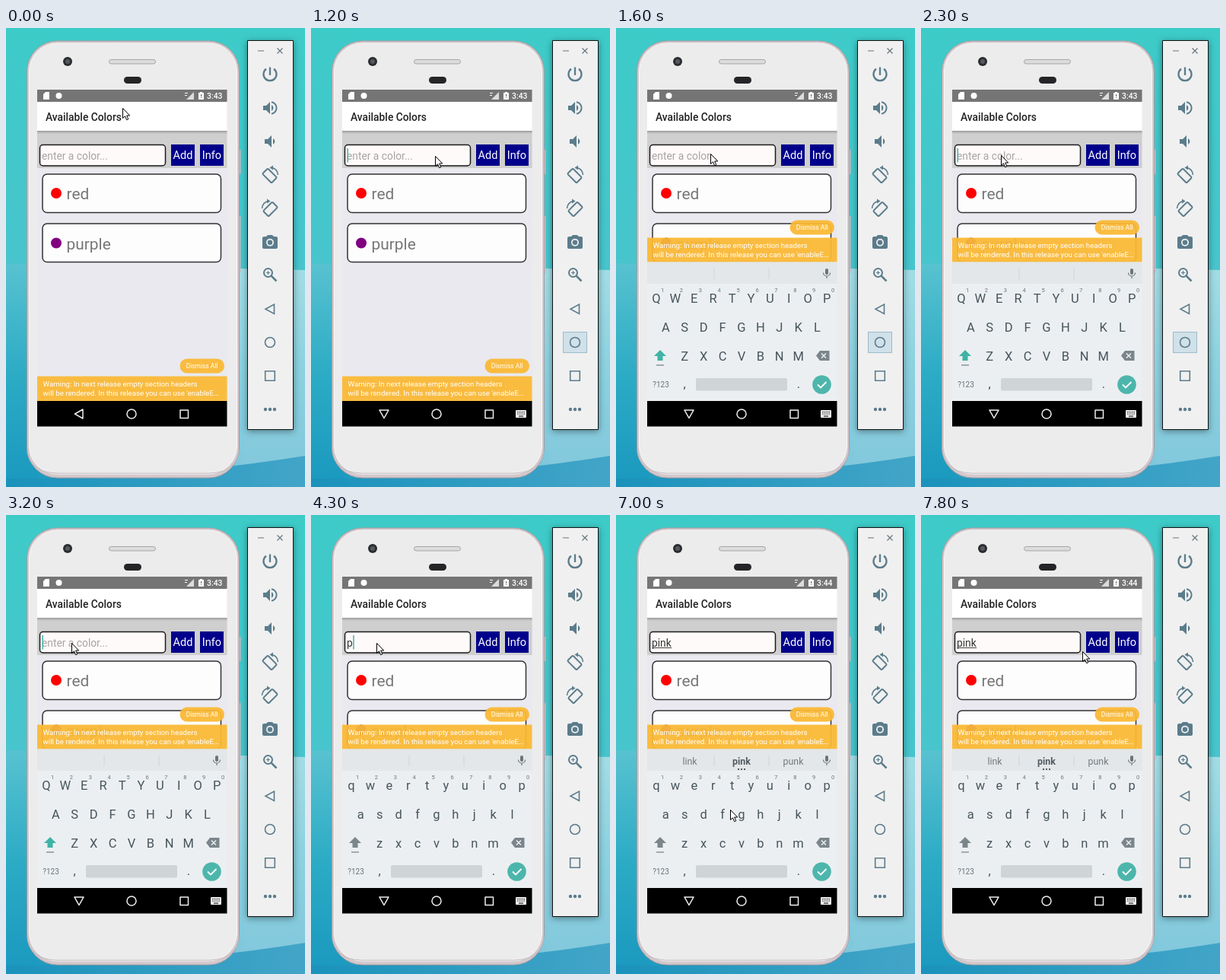
An HTML page for the animation above (8 s loop, 393 by 603 pixels).

```html
<!DOCTYPE html>
<html lang="en">
<head>
<meta charset="utf-8">
<title>Available Colors</title>
<style>
  html, body { margin: 0; width: 100%; height: 100%; overflow: hidden; }
  svg { display: block; width: 393px; height: 603px; }
  text { font-family: Roboto, sans-serif; white-space: pre; }
  .mid { text-anchor: middle; }
  .line { fill: none; stroke: #5b7c8b; stroke-width: 2; }
  .nav { fill: none; stroke: #eee; stroke-width: 1.5; stroke-linejoin: round; }
  .key { fill: #47555c; font-size: 16.5px; text-anchor: middle; }
  .digit { fill: #68747a; font-size: 7.5px; text-anchor: middle; }
  .panel { filter: drop-shadow(0 2px 4px #0006); }
</style>
</head>
<body>
<svg viewBox="0 0 393 603">
  <defs>
    <linearGradient id="sky" x2="0" y2="1">
      <stop stop-color="#3dcbc8"/><stop offset="1" stop-color="#48c4cd"/>
    </linearGradient>
    <linearGradient id="sea" x2="0" y2="1">
      <stop stop-color="#58c2d0"/><stop offset=".5" stop-color="#2cabc5"/><stop offset="1" stop-color="#1a98bf"/>
    </linearGradient>
    <linearGradient id="glow">
      <stop offset=".1" stop-color="#fff" stop-opacity="0"/><stop offset=".8" stop-color="#fff" stop-opacity=".45"/>
    </linearGradient>
    <linearGradient id="floor">
      <stop stop-color="#1a92bb"/><stop offset="1" stop-color="#42a5c8"/>
    </linearGradient>
    <linearGradient id="shade" x2="0" y2="1">
      <stop stop-color="#999"/><stop offset="1" stop-color="#cfcfcf"/>
    </linearGradient>
    <clipPath id="app"><path d="M41 81H290.500V490H41Z"/></clipPath>
  </defs>

  <path fill="url(#sky)" d="M0 0H393V325H0Z"/>
  <path fill="url(#sea)" d="M0 309L393 318V603H0Z"/>
  <path fill="url(#glow)" d="M0 309L393 318V603H0Z"/>
  <path fill="url(#floor)" d="M0 603V592Q210 592 393 562V603Z"/>

  <!-- Phone body -->
  <g stroke="#b9b0b4">
    <path fill="#ddd" d="M305 160h3v32h-3zM305 247h3v74h-3z"/>
    <rect x="27.500" y="17" width="279" height="574" rx="40" fill="#d3c8cc" stroke="#a69ba0"/>
    <rect x="30.500" y="20" width="273" height="566" rx="37" fill="#ececed" stroke="#f8f8f8"/>
    <path d="M28 554q2 29 38 31H268q36-2 38-31" fill="none" stroke="#c3b9bd"/>
    <rect x="135.500" y="41.500" width="61" height="5.500" rx="2.700" fill="#dcdcdc" stroke="#a5a5a5"/>
  </g>
  <circle cx="81" cy="44" r="6" fill="#2b2c2f"/>
  <circle cx="81" cy="44" r="3" fill="#555961"/>
  <rect x="155" y="64" width="23" height="9" rx="4.500" fill="#252528"/>

  <!-- App -->
  <g clip-path="url(#app)">
    <path fill="#e9e9ef" d="M41 81H291V490H41Z"/>
    <path fill="#757575" d="M41 81H291V97H41Z"/>
    <path fill="#cfcfcf" d="M41 135H291V184H41Z"/>
    <path fill="url(#shade)" d="M41 135H291V139H41Z"/>
    <path fill="#fff" d="M41 97H291V135H41Z"/>
    <g fill="#fff">
      <path d="M52 84h5v10h-8v-7z"/>
      <circle cx="69.500" cy="89" r="4"/>
      <path d="M247 84v10h-10z" opacity=".75"/>
      <path d="M235 85h4v1h-4zM235 88h3v1h-3z"/>
      <path d="M255 84h3v1h2v9h-7v-9h2z"/>
      <path d="M256 87h1.200v3h-1.200zM256 91h1.200v1h-1.200z" fill="#757575"/>
      <text id="clock" x="264" y="93" font-size="10.400" font-weight="500"></text>
    </g>
    <text x="52" y="122" font-size="13.800" font-weight="500" fill="#222">Available Colors</text>

    <rect x="44.500" y="153.500" width="165" height="27.500" rx="4" fill="#fffafa" stroke="#1a1a1a" stroke-width="1.500"/>
    <text id="entry" x="47" y="172.500" font-size="13.800"></text>
    <path id="underline" fill="#444" d=""/>
    <rect id="caret" y="158" width="1.500" height="18.500" fill="#43b3a8"/>
    <path fill="#00008b" d="M217 153h31v28h-31zM255 153h31v28h-31z"/>
    <g fill="#fff" font-size="14.500" class="mid">
      <text x="232.500" y="172">Add</text><text x="270.500" y="172">Info</text>
    </g>

    <g fill="#fdfdfd" stroke="#333" stroke-width="1.500">
      <rect x="48" y="192" width="234.500" height="50.500" rx="6"/>
      <rect x="48" y="257" width="234.500" height="50.500" rx="6"/>
    </g>
    <circle cx="66" cy="217" r="7" fill="red"/>
    <circle cx="66" cy="282.500" r="7" fill="purple"/>
    <g fill="#777" font-size="20.900">
      <text x="79.500" y="225">red</text><text x="79.500" y="290.500">purple</text>
    </g>

    <g id="warning">
      <g fill="#fab935" opacity=".94">
        <path d="M41 457.500H291V490H41Z"/>
        <rect x="228.500" y="434.500" width="58.500" height="19" rx="9.500"/>
      </g>
      <g fill="#fff" font-size="9.700">
        <text x="257.500" y="447" font-size="8.400" class="mid">Dismiss All</text>
        <text x="48.500" y="471">Warning: In next release empty section headers</text>
        <text x="48.500" y="483">will be rendered. In this release you can use 'enableE…</text>
      </g>
    </g>

    <g id="keyboard">
      <path fill="#eceff1" d="M41 307.500H291V490H41Z"/>
      <path fill="#e4e7e9" d="M41 307.500H291V336H41Z"/>
      <path d="M129 315.500V330M201 315.500V330" stroke="#d0d5d8"/>
      <g id="hints" fill="#72797d" font-size="12.400" class="mid">
        <text x="97" y="328">link</text>
        <text x="165" y="328" font-weight="700" fill="#525b60">pink</text>
        <text x="233" y="328">punk</text>
        <path fill="#525b60" d="M160 333h2v2h-2zM164 333h2v2h-2zM168 333h2v2h-2z"/>
      </g>
      <rect x="275" y="316" width="4" height="8" rx="2" fill="#6b7579"/>
      <path d="M272.500 321.500a4.500 4.500 0 0 0 9 0M277 326v3" fill="none" stroke="#6b7579" stroke-width="1.200"/>
      <g id="keys"></g>
      <path id="shift" d="M58 423l8 8h-4.500v6h-7v-6H50z"/>
      <path fill="#9aa2a6" d="M53 442h10v1.800H53z"/>
      <path fill="#7b868b" d="M263 430.500l5-6.500h12.500v13H268z"/>
      <path d="M270 427.500l6 6m0-6l-6 6" stroke="#eceff1" stroke-width="1.500"/>
      <text x="59" y="472" font-size="10" fill="#68747a" class="mid">?123</text>
      <text x="90" y="473" class="key">,</text><text x="240" y="473" class="key">.</text>
      <rect x="105" y="460" width="120" height="16.500" rx="2" fill="#cfd4d6"/>
      <circle cx="270.500" cy="468.500" r="12.300" fill="#4db6ac"/>
      <path d="M265 468.500l4 4 7.500-7.500" fill="none" stroke="#fff" stroke-width="1.800"/>
    </g>
  </g>

  <path d="M41 490H290.500V523.500H41Z"/>
  <g class="nav">
    <path id="back"/>
    <circle cx="165" cy="507" r="6"/>
    <path d="M229 502h10.500v10.500H229z"/>
  </g>
  <g id="imeIcon">
    <rect x="269" y="502" width="14" height="10" rx="1" fill="#eee"/>
    <path d="M271 504.500h10M271 507h10" stroke="#000" stroke-dasharray="1.200 1"/>
    <path d="M273 510h6" stroke="#000"/>
  </g>

  <!-- Emulator panel -->
  <path class="panel" fill="#f0f0f0" stroke="#111" d="M317.500 16.500h60v511h-60z"/>
  <path d="M331 30h8M356.500 26.500l7 7m0-7l-7 7" stroke="#68777e" stroke-width="1.200"/>
  <rect id="focus" x="331.500" y="399.500" width="31" height="27" fill="#d0e1e9" stroke="#9dbccb"/>
  <g fill="#5b7c8b">
    <g transform="translate(347 61)" class="line">
      <path d="M0-9.500V1M-5-7.200a8.500 8.500 0 1 0 10 0" stroke-width="2.300"/>
    </g>
    <g transform="translate(347 105)">
      <path d="M-9-3h4l5-5V8l-5-5h-4zM2-4a4.500 4.500 0 0 1 0 8z"/>
      <path class="line" d="M2-7.700a7.800 7.800 0 0 1 0 15.400"/>
    </g>
    <path transform="translate(347 149)" d="M-7-3h4l5-5V8l-5-5h-4zM4-4a4.500 4.500 0 0 1 0 8z"/>
    <g id="rotate">
      <rect x="-5" y="-8.500" width="10" height="17" rx="1.500" transform="translate(-.5 1) rotate(-45)" class="line"/>
      <path d="M2-9.500Q9.500-8.500 10.500 0" class="line" style="stroke-width:1.600"/>
      <path d="M-.5-9.500l4.500-3v6z"/>
    </g>
    <g transform="translate(347 281)">
      <path d="M-3-9h6l2 2h3a2 2 0 0 1 2 2V7a2 2 0 0 1-2 2h-16a2 2 0 0 1-2-2V-5a2 2 0 0 1 2-2H-5z"/>
      <circle cy=".8" r="5" fill="#f0f0f0"/><circle cy=".8" r="3.200"/>
    </g>
    <g transform="translate(347 324)" class="line">
      <circle cx="-2.500" cy="-2.500" r="5.500"/>
      <path d="M1.700 1.700L8.500 8.500" stroke-width="2.600"/>
      <path d="M-5-2.500h5M-2.500-5v5" stroke-width="1.200"/>
    </g>
    <g class="line" style="stroke-width:1.600">
      <path d="M352.500 363v12.500l-11.500-6.200z"/>
      <circle cx="347" cy="413" r="6.500"/>
      <path d="M340.700 450.700h12.600v12.600h-12.600z"/>
    </g>
    <circle cx="341" cy="501" r="2.200"/><circle cx="347" cy="501" r="2.200"/><circle cx="353" cy="501" r="2.200"/>
  </g>

  <path id="pointer" d="M.5.5V13.500L3.500 10.800 5.600 15.700 7.800 14.800 5.700 10H9.700Z" fill="#fff" stroke="#000"/>
</svg>

<script>
const LOOP = 8000, STEP = 100;
const $ = id => document.getElementById(id);
const show = (id, on) => $(id).style.display = on ? '' : 'none';

// The two rotate buttons mirror each other.
const rotate = $('rotate'), mirrored = rotate.cloneNode(true);
rotate.setAttribute('transform', 'translate(347 193)');
mirrored.removeAttribute('id');
mirrored.setAttribute('transform', 'translate(347 237) scale(-1 1)');
rotate.after(mirrored);

const rows = [['qwertyuiop', 53, 361], ['asdfghjkl', 65.3, 399], ['zxcvbnm', 90.2, 437]];
const label = (cls, x, y, s) => `<text class="${cls}" x="${x}" y="${y}">${s}</text>`;
$('keys').innerHTML = rows.map(([letters, x, y], row) => [...letters].map((c, i) => {
  const cx = x + i * 24.9;
  return label('key letter', cx, y, c) +
    (row ? '' : label('digit', cx + 8, 347, (i + 1) % 10));
}).join('')).join('');
const letters = [...document.querySelectorAll('.letter')];

// Pointer stops: time, x, y
const path = [
  [0, 153, 105], [300, 167, 148], [500, 163, 168], [1300, 163, 168],
  [1600, 124, 165], [2200, 124, 165], [2400, 86, 168], [6600, 86, 168],
  [7000, 150, 387], [7500, 208, 192], [7800, 212, 179], [LOOP, 212, 179]
];
function pointerAt(t) {
  const i = path.findIndex(p => p[0] > t);
  const [t0, x0, y0] = path[i - 1], [t1, x1, y1] = path[i];
  const k = (t - t0) / (t1 - t0);
  return [x0 + (x1 - x0) * k, y0 + (y1 - y0) * k].map(Math.round);
}

// Times at which the caret toggles, starting hidden
const blinks = [900, 1400, 1900, 3600, 4100, 5800, 6200, 6700, 7200, 7700];
const strokes = [4300, 4700, 4900, 5100];
const passed = (times, t) => times.filter(s => t >= s).length;

function draw(t) {
  const typed = 'pink'.slice(0, passed(strokes, t));
  const upper = !typed, ime = t >= 1200, open = t >= 1400;

  $('pointer').setAttribute('transform', `translate(${pointerAt(t)})`);
  $('clock').textContent = t < 4400 ? '3:43' : '3:44';

  const entry = $('entry');
  entry.textContent = typed || 'enter a color...';
  entry.setAttribute('fill', typed ? '#333' : '#a9a4a4');
  const width = typed ? entry.getComputedTextLength() : 0;
  $('underline').setAttribute('d', t >= 4400 ? `M47.500 174h${width}v1h${-width}z` : '');
  $('caret').setAttribute('x', 47.5 + width);
  show('caret', passed(blinks, t) % 2);

  show('focus', t >= 800 && t < 3200);
  show('imeIcon', ime);
  $('back').setAttribute('d', ime ? 'M90 502h12l-6 10.500z' : 'M101 501v12l-10.500-6z');

  $('warning').setAttribute('transform', `translate(0 ${open ? -182 : 0})`);
  show('keyboard', open);
  $('keyboard').setAttribute('transform', `translate(0 ${t < 1500 ? 60 : 0})`);
  $('keyboard').setAttribute('opacity', t < 1500 ? .6 : 1);
  $('shift').setAttribute('fill', upper ? '#3fb3a5' : '#7b868b');
  show('hints', t >= 5200);
  for (const key of letters) {
    const c = key.textContent;
    key.textContent = upper ? c.toUpperCase() : c.toLowerCase();
  }
}

const start = performance.now();
let last = -1;
function tick() {
  const elapsed = Math.max(0, performance.now() - start) % LOOP;
  const t = Math.floor(elapsed / STEP) * STEP;
  if (t !== last) draw(last = t);
  requestAnimationFrame(tick);
}
tick();
</script>
</body>
</html>
```
